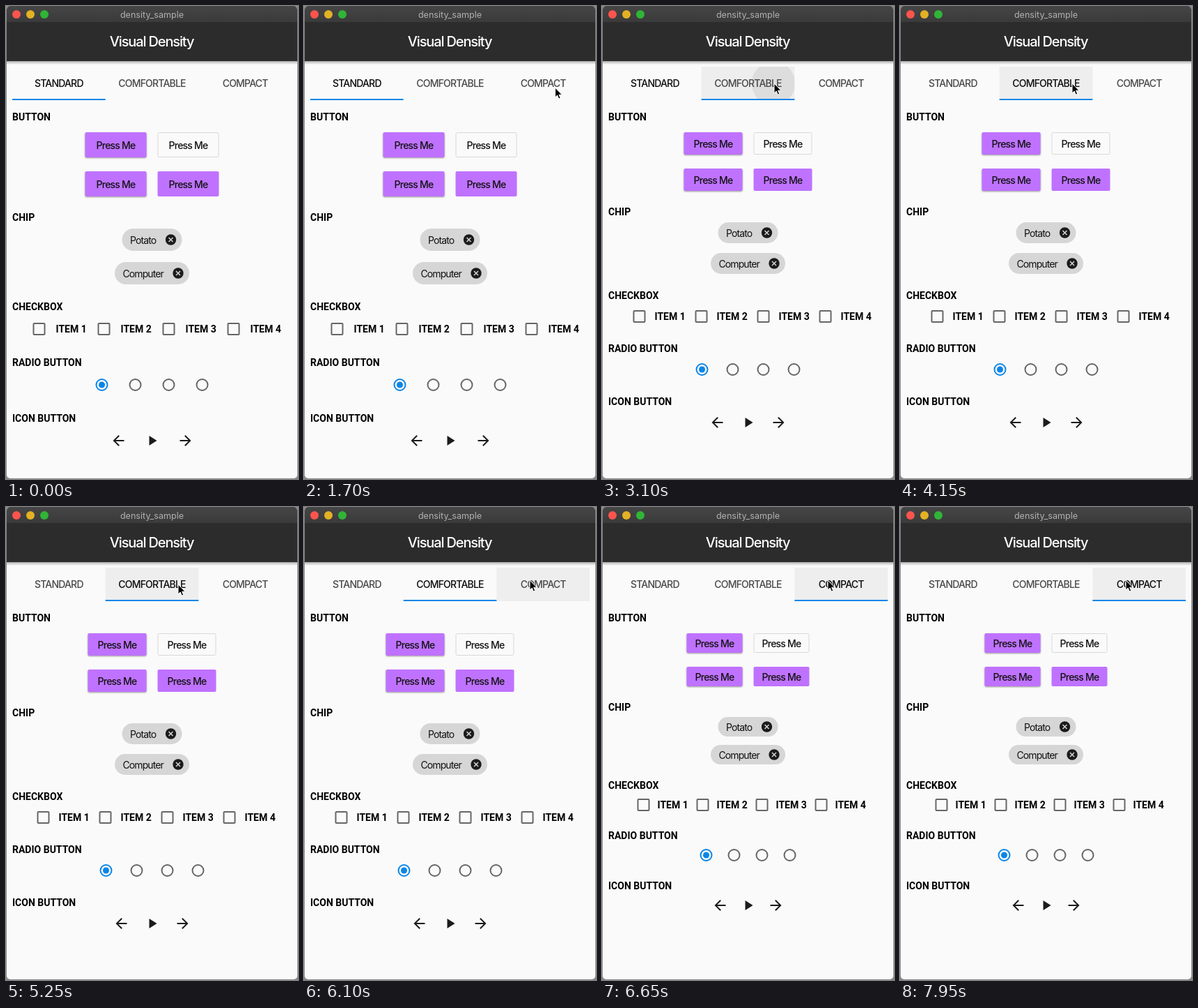
An HTML page for the animation above (8000 ms loop, 419 by 678 pixels).

```html
<!DOCTYPE html>
<html lang="en">
<head>
<meta charset="utf-8">
<title>Visual Density</title>
<style>
  html, body { margin: 0; width: 100%; height: 100%; overflow: hidden; background: #8a8a8a; }
  svg { display: block; width: 419px; height: 678px; }
  text { font: 500 14px Inter, sans-serif; letter-spacing: -.057em; fill: #111; }
  .mid { text-anchor: middle; }
  .chip { font-weight: 400; letter-spacing: -.065em; }
  .head { font: 700 14px Roboto, sans-serif; letter-spacing: 0; fill: #000; }
  .window { font: 400 12.6px Inter, sans-serif; letter-spacing: 0; fill: #b0b0b0; }
  .bar { font-size: 20px; fill: #fff; }
  .raised { filter: drop-shadow(0 1px 1px #0006); }
</style>
</head>
<body>
<svg viewBox="0 0 419 678">
  <defs>
    <linearGradient id="frame" x2="0" y2="1"><stop stop-color="#464646"/><stop offset="1" stop-color="#3a3a3a"/></linearGradient>
    <linearGradient id="shade" x2="0" y2="1"><stop stop-color="#000" stop-opacity=".3"/><stop offset="1" stop-color="#000" stop-opacity="0"/></linearGradient>
    <clipPath id="win"><rect x="1" y="0" width="417" height="677" rx="5"/></clipPath>
  </defs>
  <g clip-path="url(#win)">
    <rect width="419" height="678" fill="#fafafa"/>
    <rect width="419" height="23" fill="url(#frame)"/>
    <rect y="23" width="419" height="56" fill="#2c2c2c"/>
    <rect y="79" width="419" height="5" fill="url(#shade)"/>
    <circle cx="15" cy="12" r="6" fill="#fb544d"/>
    <circle cx="35" cy="12" r="6" fill="#e3b125"/>
    <circle cx="55" cy="12" r="6" fill="#30b536"/>
    <text class="window mid" x="209.5" y="17">density_sample</text>
    <text class="bar mid" x="209" y="58">Visual Density</text>
    <g id="page"></g>
  </g>
  <path id="cursor" d="M0 0V14l3.2-3 2.1 5 2.4-1-2.1-4.8h4.4z" stroke="#fff"/>
</svg>
<script>
const LOOP = 8000;
const BLUE = '#0a86e8', PURPLE = '#bf72ff';
const TABS = ['STANDARD', 'COMFORTABLE', 'COMPACT'];
const TAB_W = 401 / 3;
const ICONS = [
  'M20 11H7.83l5.59-5.59L12 4l-8 8 8 8 1.41-1.41L7.83 13H20z',
  'M8 5v14l11-7z',
  'M12 4l-1.41 1.41L16.17 11H4v2h12.17l-5.58 5.59L12 20l8-8z'
];
// Times at which a tab takes effect; the press starts a little earlier
const SWITCHES = [3100, 6200];
const PRESS = 100;

const page = document.getElementById('page');
const cursor = document.getElementById('cursor');

const clamp = v => Math.min(1, Math.max(0, v));
const mix = (a, b, p) => a + (b - a) * p;
const easeOut = p => 1 - (1 - p) ** 3;
const easeInOut = p => p * p * (3 - 2 * p);
const tabX = i => 9 + i * TAB_W;
const repeat = (n, draw) => Array.from({ length: n }, (_, i) => draw(i)).join('');

const rect = (x, y, w, h, attrs) => `<rect x="${x}" y="${y}" width="${w}" height="${h}" ${attrs}/>`;
const circle = (x, y, r, attrs) => `<circle cx="${x}" cy="${y}" r="${r}" ${attrs}/>`;
const text = (x, y, label, cls = '', attrs = '') => `<text class="${cls}" x="${x}" y="${y}" ${attrs}>${label}</text>`;
const heading = (y, label) => text(9, y + 5, label, 'head');

function cursorAt(t) {
  const a = easeOut(clamp((t - 1700) / 500));
  const b = easeInOut(clamp((t - 5500) / 500));
  return [mix(mix(361, 247, a), 324, b), mix(mix(117, 111, a), 105, b)];
}

function hoveredTab(t, x) {
  if (t < 1700) return -1;
  if (x < tabX(2)) return 1;
  return t > 5000 ? 2 : -1;
}

function tabs(t, x, y, active) {
  let out = '';
  const hover = hoveredTab(t, x);
  if (hover >= 0) out += rect(tabX(hover), 87, TAB_W, 48, 'fill="#eee"');
  SWITCHES.forEach((at, i) => {
    const age = t - at + PRESS;
    if (age <= 0 || age >= 2 * PRESS) return;
    const fade = .07 * clamp((2 * PRESS - age) / 80);
    out += `<clipPath id="ink">${rect(tabX(i + 1), 87, TAB_W, 48, '')}</clipPath>`
      + circle(x - 1, y, 31 * age / PRESS, `fill-opacity="${fade}" clip-path="url(#ink)"`);
  });
  out += rect(tabX(active), 133, TAB_W, 2, `fill="${BLUE}"`);
  const done = active ? clamp((t - SWITCHES[active - 1]) / PRESS) : 1;
  return out + repeat(3, i => {
    const on = i === active ? done : i === active - 1 ? 1 - done : 0;
    const grey = Math.round(mix(72, 10, on));
    return text(tabX(i + .5), 116, TABS[i], 'mid', `style="fill:rgb(${grey},${grey},${grey})"`);
  });
}

function button(x, y, w, h, kind) {
  const body = kind === 'outline'
    ? rect(x + .5, y + .5, w - 1, h - 1, 'rx="2" fill="none" stroke="#d8d8d8"')
    : rect(x, y, w, h, `rx="2" fill="${PURPLE}" class="${kind}"`);
  return body + text(x + w / 2, y + h / 2 + 6, 'Press Me', 'mid');
}

function chip(x, w, y, h, label) {
  const cx = x + w - 16;
  return rect(x, y - h / 2, w, h, `rx="${h / 2}" fill="#d6d6d6"`)
    + text(x + 11.5, y + 6, label, 'chip')
    + circle(cx, y, 7.7, 'fill="#1b1b1b"')
    + `<path d="M${cx - 3} ${y - 3}l6 6m0-6l-6 6" stroke="#d6d6d6" stroke-width="1.5"/>`;
}

// d is the density step: 0 standard, 1 comfortable, 2 compact
function controls(d) {
  const w = 88 - 4 * d, h = 36 - 4 * d, step = 48 - 4 * d, itemStep = 93 - 4 * d;
  const row = (y, left, right) => button(201.5 - w, y, w, h, left) + button(217.5, y, w, h, right);
  const checkY = 463 - 18 * d, radioY = 543 - 22 * d, iconY = 623 - 26 * d;
  return heading(159, 'BUTTON')
    + row(181, 'raised', 'outline') + row(201 + h, 'raised', 'flat')
    + heading(303 - 8 * d, 'CHIP')
    + chip(166.5, 86, 335 - 10 * d, 32 - 2 * d, 'Potato')
    + chip(156, 107, 383 - 14 * d, 32 - 2 * d, 'Computer')
    + heading(431 - 16 * d, 'CHECKBOX')
    + repeat(4, i => rect(39.5 + 6 * d + i * itemStep, checkY - 8, 16, 16, 'rx="1" fill="none" stroke="#666" stroke-width="2"')
      + text(71.5 + 4 * d + i * itemStep, checkY + 5, `ITEM ${i + 1}`, 'head'))
    + heading(511 - 20 * d, 'RADIO BUTTON')
    + repeat(4, i => {
      const x = 137.5 + 6 * d + i * step;
      return circle(x, radioY, 8, `fill="none" stroke="${i ? '#666' : BLUE}" stroke-width="2"`)
        + (i ? '' : circle(x, radioY, 4.5, `fill="${BLUE}"`));
    })
    + heading(591 - 24 * d, 'ICON BUTTON')
    + repeat(3, i => `<path transform="translate(${197.5 + (i - 1) * step} ${iconY - 12})" d="${ICONS[i]}" fill="#1b1b1b"/>`);
}

let shown = '';
function draw(now) {
  const t = now % LOOP;
  const [x, y] = cursorAt(t);
  const active = SWITCHES.filter(at => t >= at).length;
  const html = tabs(t, x, y, active) + controls(active);
  if (html !== shown) page.innerHTML = shown = html;
  cursor.setAttribute('transform', `translate(${x} ${y})`);
  cursor.style.display = t < 1700 ? 'none' : '';
}

const start = performance.now();
function tick() {
  draw(performance.now() - start);
  requestAnimationFrame(tick);
}
tick();
</script>
</body>
</html>
```
